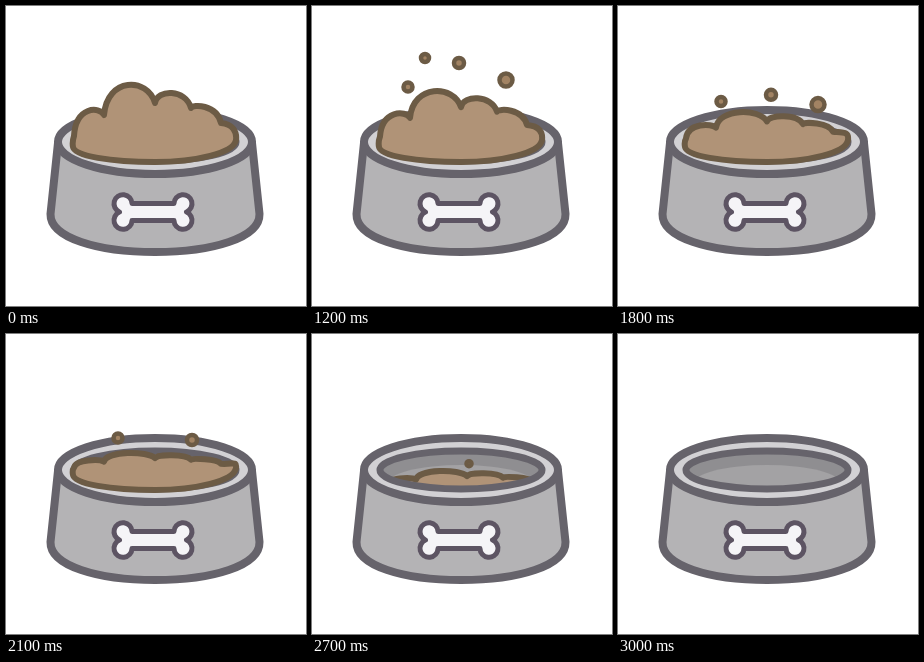
Recreate the animation shown at these times as an HTML page. Size 300 by 300 pixels, loop 6000 ms.

```html
<!DOCTYPE html>
<html lang="en">
<head>
<meta charset="utf-8">
<title>Dog bowl</title>
<style>
  html, body { margin: 0; width: 100%; height: 100%; overflow: hidden; background: #fff; }
  svg { display: block; width: 100%; height: 100%; }
  .line { stroke: #66636b; stroke-width: 8; stroke-linejoin: round; }
  .lip { stroke-width: 7; }
  .bone { fill: #f5f4f7; stroke: #5d5463; stroke-width: 5; stroke-linejoin: round; }
  .food { fill: #b09377; stroke: #6c5b45; stroke-width: 6; stroke-linejoin: round; }
  .crumb { fill: #a28363; stroke: #6c5b45; stroke-width: 4.5; }
</style>
</head>
<body>
<svg viewBox="0 0 300 300">
  <defs>
    <ellipse id="opening" cx="149" cy="136" rx="81" ry="19"/>
    <clipPath id="inside"><use href="#opening"/></clipPath>
  </defs>
  <path class="line" fill="#b4b3b5" d="M52 137L44.500 208C44 232 92 246 149 246S254 232 253.500 208L246 137Z"/>
  <ellipse class="line" cx="149" cy="136" rx="97" ry="32" fill="#d2d1d4"/>
  <use href="#opening" fill="#8f8e91"/>
  <ellipse cx="149" cy="150" rx="74" ry="19" fill="#a3a2a4" clip-path="url(#inside)"/>
  <g id="sunk" clip-path="url(#inside)"></g>
  <use href="#opening" class="line lip" fill="none"/>
  <g id="heaped"></g>
  <path class="bone" d="M126 197.500H168A9 9 0 1 1 180.500 206A9 9 0 1 1 168 214.500H126A9 9 0 1 1 113.500 206A9 9 0 1 1 126 197.500Z"/>
  <g id="crumbs"></g>
</svg>
<script>
const LOOP = 6000, REST = 1200, STEP = 300;
const LAST_HEAPED = 4, LAST_STEP = 6;
const BASE = 135;

// Full mound: end and peak of each lobe, heights above BASE
const lobes = [
  { end: 98, height: 26, peak: 30 },
  { end: 149, height: 38, peak: 56 },
  { end: 185, height: 33, peak: 48 },
  { end: 215, height: 18, peak: 34 }
];

// Each crumb drifts sideways and closes in on its floor
const crumbs = [
  { x: 96, y: 81, r: 4.5, drift: 3.5, floor: 105, first: 1, last: 3 },
  { x: 113, y: 52, r: 4, drift: 0, floor: 105, first: 1, last: 1 },
  { x: 147, y: 57, r: 5, drift: 3, floor: 110, first: 1, last: 3 },
  { x: 194, y: 74, r: 6.5, drift: 3, floor: 115, first: 1, last: 3 },
  { x: 112, y: 104, r: 4.5, drift: -16, floor: 150, first: 4, last: 5 },
  { x: 186, y: 106, r: 5, drift: 9, floor: 150, first: 4, last: 5 },
  { x: 157, y: 121, r: 2.5, drift: 0, floor: 150, first: 5, last: 6 }
];

function add(parent, tag, attrs) {
  const el = document.createElementNS("http://www.w3.org/2000/svg", tag);
  for (const key in attrs) el.setAttribute(key, attrs[key]);
  return document.getElementById(parent).appendChild(el);
}

function moundPath(scale) {
  const level = height => BASE - height * scale;
  let x = 68, y = level(5);
  let d = `M${x} ${y}`;
  for (const { end, height, peak } of lobes) {
    const w = end - x, endY = level(height);
    const pull = (level(peak) - (y + endY) / 8) / 0.75;
    d += `C${x + w * 0.06} ${pull} ${end - w * 0.15} ${pull} ${end} ${endY}`;
    [x, y] = [end, endY];
  }
  return d + `C${x + 12} ${y + 1} 231 126 230 134C228 147 190 156 149 156C105 156 68 150 67 141Q66 136 68 ${level(5)}Z`;
}

const startOf = step => step === 0 ? 0 : REST + (step - 1) * STEP;

function showDuring(el, step) {
  const key = (time, opacity) => ({ offset: time / LOOP, opacity, easing: "step-end" });
  const keys = [key(startOf(step), 1), key(startOf(step + 1), 0), key(LOOP, 0)];
  if (step > 0) keys.unshift(key(0, 0));
  el.animate(keys, { duration: LOOP, iterations: Infinity });
}

for (let step = 0; step <= LAST_STEP; step++) {
  const flat = Math.min(step, LAST_HEAPED);
  const sink = step - flat;
  const mound = add(sink ? "sunk" : "heaped", "path", {
    class: "food",
    d: moundPath(1 - 0.11 * flat ** 1.35),
    transform: `translate(${sink ? 6 : 0} ${sink * 9})`
  });
  showDuring(mound, step);

  for (const { x, y, r, drift, floor, first, last } of crumbs) {
    if (step < first || step > last) continue;
    const age = step - first;
    const cx = x + drift * age;
    const cy = y + (floor - y) * 0.3 * age;
    showDuring(add("crumbs", "circle", { class: "crumb", cx, cy, r }), step);
  }
}
</script>
</body>
</html>
```
